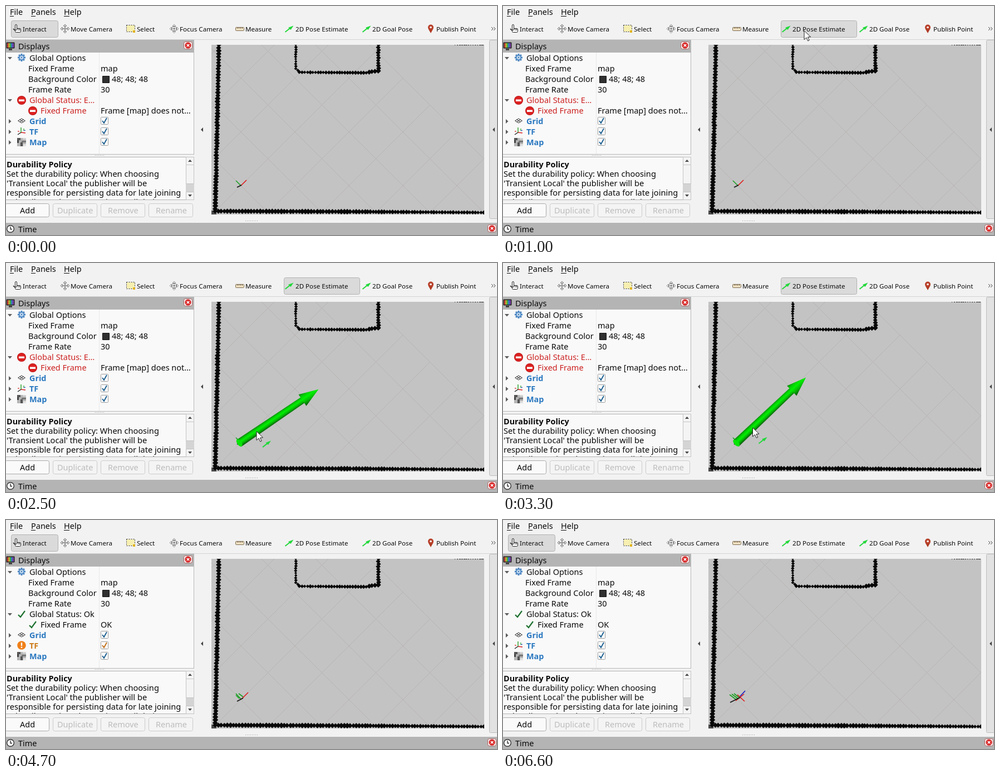
Recreate the animation shown at these times as an HTML page with a canvas. Size 882 by 413 pixels, loop 6700 ms.

```html
<!DOCTYPE html>
<html lang="en">
<head>
<meta charset="utf-8">
<title>Pose estimate</title>
<style>
html, body { margin: 0; width: 100%; height: 100%; overflow: hidden; background: #f2f2f2; }
canvas { display: block; }
</style>
</head>
<body>
<canvas id="stage" width="882" height="413"></canvas>
<script>
const ctx = document.getElementById('stage').getContext('2d');
const LOOP = 6700, STEP = 100;
const FONT = '"Noto Sans", "Open Sans", sans-serif';
const INK = '#0a0a0a', BLUE = '#2a78c0', RED = '#cc2020';
const ORIGIN = { x: 420, y: 324 };

function rect(x, y, w, h, fill) {
  ctx.fillStyle = fill;
  ctx.fillRect(x, y, w, h);
}

function box(x, y, w, h, r, fill, stroke) {
  ctx.beginPath();
  ctx.roundRect(x + 0.5, y + 0.5, w - 1, h - 1, r);
  ctx.fillStyle = fill;
  ctx.fill();
  if (stroke) {
    ctx.lineWidth = 1;
    ctx.strokeStyle = stroke;
    ctx.stroke();
  }
}

function path(pts, close) {
  ctx.beginPath();
  pts.forEach(([x, y], i) => i ? ctx.lineTo(x, y) : ctx.moveTo(x, y));
  if (close) ctx.closePath();
}

function poly(pts, fill) {
  path(pts, true);
  ctx.fillStyle = fill;
  ctx.fill();
}

function line(pts, color, width = 1) {
  path(pts);
  ctx.strokeStyle = color;
  ctx.lineWidth = width;
  ctx.stroke();
}

function disc(x, y, r, fill) {
  ctx.beginPath();
  ctx.arc(x, y, r, 0, 7);
  ctx.fillStyle = fill;
  ctx.fill();
}

function text(s, x, y, color = INK, size = 14.5, weight = 400) {
  ctx.font = `${weight} ${size}px ${FONT}`;
  ctx.fillStyle = color;
  ctx.fillText(s, x, y);
}

function at(x, y, draw) {
  ctx.save();
  ctx.translate(x, y);
  draw();
  ctx.restore();
}

function random(seed) {
  return () => (seed = (seed * 16807) % 2147483647) / 2147483647;
}

// Small icons, drawn around the origin
const poseIcon = () => {
  line([[-7.5, 6], [2, -1.5]], '#22d83a', 2);
  poly([[7.5, -5.5], [2.5, 2], [-2, -2]], '#22d83a');
};

const handIcon = () => {
  box(-4, -1, 11, 8, 2, '#fff', '#222');
  box(-4, -8, 4, 11, 2, '#fff', '#222');
  line([[-4, 3], [-7, 0]], '#222', 1.5);
  line([[2, 0], [2, 3]], '#222');
  line([[4.5, 0], [4.5, 3]], '#222');
};

function crossArrows(color) {
  for (let i = 0; i < 4; i++) {
    ctx.rotate(Math.PI / 2);
    line([[0, 2], [0, 5]], color, 1.5);
    path([[-3, 5], [0, 8], [3, 5]], true);
    ctx.fillStyle = '#fff';
    ctx.fill();
    ctx.strokeStyle = color;
    ctx.lineWidth = 1;
    ctx.stroke();
  }
}

const moveIcon = () => {
  crossArrows('#777');
  disc(0, 0, 2, '#999');
};

const focusIcon = () => {
  crossArrows('#999');
  ctx.beginPath();
  ctx.arc(0, 0, 4.5, 0, 7);
  ctx.strokeStyle = '#666';
  ctx.stroke();
  disc(0, 0, 1.2, '#444');
};

const selectIcon = () => {
  rect(-7, -6, 14, 11, '#f7efb0');
  ctx.setLineDash([2, 2]);
  ctx.strokeStyle = '#333';
  ctx.lineWidth = 1;
  ctx.strokeRect(-7.5, -6.5, 15, 12);
  ctx.setLineDash([]);
  rect(4, 3, 4, 4, '#e0b010');
};

const rulerIcon = () => {
  box(-8, -3, 16, 7, 1, '#f0e2c4', '#7a6850');
  for (let x = -5; x < 7; x += 3) line([[x + 0.5, -3], [x + 0.5, 0]], '#6a5840');
};

const pinIcon = () => {
  poly([[-4.5, 0], [4.5, 0], [0, 8]], '#b03a20');
  disc(0, -2.5, 5, '#b8402a');
  disc(0, -2.5, 1.8, '#fff');
};

const gearIcon = () => {
  for (let i = 0; i < 8; i++) {
    ctx.rotate(Math.PI / 4);
    rect(-1.5, -7, 3, 3, '#4a82bd');
  }
  disc(0, 0, 5.2, '#5b93cc');
  disc(0, 0, 3, '#dce9f6');
  disc(0, 0, 1.4, '#4a82bd');
};

const gridIcon = () => {
  for (const k of [-1, 0, 1]) {
    const dx = k * 3.2, dy = k * 2;
    line([[dx - 3.2, dy + 2], [dx + 3.2, dy - 2]], '#333');
    line([[dx - 3.2, -dy - 2], [dx + 3.2, -dy + 2]], '#333');
  }
};

const tfIcon = () => {
  line([[-1, 2], [-1, -7]], '#28a028', 1.4);
  line([[-1, 2], [7, 3]], '#d82020', 1.4);
  line([[-1, 2], [-7, 6]], '#222', 1.4);
  line([[4, -1], [4, -5]], '#28a028', 1.2);
  line([[4, -1], [7, -2]], '#2040c0', 1.2);
  line([[-7, 0], [-4, 0]], '#d82020', 1.2);
};

const mapIcon = () => {
  rect(-8, -7, 16, 15, '#b4b4b4');
  rect(-8, -7, 6, 4, '#555');
  rect(-8, -3, 3, 5, '#444');
  rect(0, -2, 8, 3, '#777');
  rect(-2, 1, 4, 7, '#555');
  rect(3, 4, 5, 4, '#e2e2e2');
  rect(2, -7, 6, 3, '#d4d4d4');
};

const errorIcon = () => {
  disc(0, 0, 8, '#c41818');
  disc(0, 0, 6.8, '#dd2222');
  rect(-5, -1.5, 10, 3.5, '#fff');
};

const okIcon = () => line([[-6, 1], [-2, 5], [6, -6]], '#1d7030', 2.2);

const warnIcon = () => {
  disc(0, 0, 7.8, '#f08018');
  rect(-1.2, -5, 2.4, 6, '#fff');
  rect(-1.2, 2.5, 2.4, 2.4, '#fff');
};

const closeIcon = () => {
  box(-8, -7, 16, 14, 3, '#f2eeee', '#b06060');
  disc(0, 0, 5.5, '#d82424');
  line([[-2.3, -2.3], [2.3, 2.3]], '#fff', 1.6);
  line([[2.3, -2.3], [-2.3, 2.3]], '#fff', 1.6);
};

function expander(y, open) {
  poly(open ? [[3, y - 2], [11, y - 2], [7, y + 2.5]] : [[5, y - 4], [9.5, y], [5, y + 4]], '#5c5c5c');
}

function tool(x, label, iconX, icon, span, checked) {
  if (checked) box(span[0], 26, span[1], 31, 3, '#dadada', '#b2b2b2');
  at(iconX, 41, icon);
  text(label, x, 46, INK, 11.6);
}

function toolbar(posing) {
  text('File', 7, 16);
  text('Panels', 45, 16);
  text('Help', 104, 16);
  for (const [x, w] of [[7, 7], [45, 8], [104, 10]]) rect(x, 18, w, 1, INK);
  tool(30, 'Interact', 20, handIcon, [9, 85], !posing);
  tool(116, 'Move Camera', 106, moveIcon);
  tool(235, 'Select', 224, selectIcon);
  tool(312, 'Focus Camera', 302, focusIcon);
  tool(430, 'Measure', 420, rulerIcon);
  tool(520, '2D Pose Estimate', 509, poseIcon, [499, 137], posing);
  tool(658, '2D Goal Pose', 648, poseIcon);
  tool(773, 'Publish Point', 763, pinIcon);
  for (const x of [872, 876]) line([[x, 38], [x + 3, 41], [x, 44]], '#444');
}

function checkbox(y, color) {
  box(170, y - 7, 14, 14, 1, '#fff', '#9a9a9a');
  line([[173, y], [176, y + 4], [181, y - 5]], color, 2);
}

function displays(ok, warn) {
  rect(0, 61, 338, 23, '#b4b4b4');
  box(0, 65, 16, 12, 1, '#222');
  ['#c83a3a', '#d0c030', '#38b048', '#3880d0', '#8040b0'].forEach((c, i) => rect(2 + i * 2.4, 67, 2.4, 8, c));
  rect(5, 77, 6, 3, '#444');
  text('Displays', 22, 78);
  at(327, 71, closeIcon);

  rect(0, 84, 338, 184, '#f9f9f9');
  rect(0, 267, 338, 1, '#b8b8b8');
  rect(337, 84, 1, 184, '#b8b8b8');
  rect(167, 84, 1, 183, '#e8e8e8');

  expander(94, true);
  at(28, 93, gearIcon);
  text('Global Options', 42, 99);
  text('Fixed Frame', 40, 118);
  text('map', 170, 118);
  text('Background Color', 40, 137);
  box(173, 126, 13, 13, 0, '#303030', '#111');
  text('48; 48; 48', 190, 137);
  text('Frame Rate', 40, 156);
  text('30', 170, 156);

  const tone = ok ? INK : RED, mark = ok ? okIcon : errorIcon;
  expander(170, true);
  at(28, 170, mark);
  text(ok ? 'Global Status: Ok' : 'Global Status: E…', 42, 175, tone);
  at(48, 189, mark);
  text('Fixed Frame', 62, 194, tone);
  text(ok ? 'OK' : 'Frame [map] does not…', 170, 194);

  [['Grid', gridIcon], ['TF', warn ? warnIcon : tfIcon], ['Map', mapIcon]].forEach(([name, icon], i) => {
    const y = 208 + i * 19, alert = warn && i === 1;
    expander(y, false);
    at(28, y - 1, icon);
    text(name, 42, y + 5, alert ? '#cc7a18' : BLUE, 14.4, 700);
    checkbox(y - 1, alert ? '#c0701c' : '#1e6090');
  });
}

function dots(x0, x1, y) {
  for (let x = x0; x < x1; x += 3) rect(x, y, 1, 1, '#999');
}

function help() {
  dots(160, 178, 269);
  rect(0, 272, 338, 78, '#f9f9f9');
  ctx.save();
  ctx.beginPath();
  ctx.rect(0, 272, 323, 77);
  ctx.clip();
  text('Durability Policy', 1, 291, INK, 14.4, 700);
  ['Set the durability policy: When choosing', "'Transient Local' the publisher will be",
    'responsible for persisting data for late joining', 'subscribers when they arrive, until their'
  ].forEach((s, i) => text(s, 1, 308 + i * 17, INK, 14.6));
  ctx.restore();
  rect(0, 272, 338, 1, '#b4b4b4');
  rect(0, 349, 338, 1, '#b4b4b4');
  rect(323, 273, 15, 76, '#d4d4d4');
  box(323, 272, 15, 15, 0, '#f4f4f4', '#c4c4c4');
  box(323, 286, 15, 35, 0, '#f4f4f4', '#c4c4c4');
  box(323, 335, 15, 15, 0, '#f4f4f4', '#c4c4c4');
  poly([[327, 281], [334, 281], [330.5, 277]], '#444');
  poly([[327, 340], [334, 340], [330.5, 344]], '#444');

  ['Add', 'Duplicate', 'Remove', 'Rename'].forEach((s, i) => {
    box(i ? i * 86 - 2 : -2, 356, 80, 25, 3, i ? '#f4f4f4' : '#fafafa', i ? '#cbcbcb' : '#aaa');
    text(s, [25, 92, 183, 269][i], 374, i ? '#bcbcbc' : INK);
  });
}

function diamonds(x0, y0, x1, y1, gap, r0, r1, seed) {
  const rnd = random(seed), n = Math.round(Math.hypot(x1 - x0, y1 - y0) / gap);
  for (let i = 0; i <= n; i++) {
    const k = i / n, r = r0 + (r1 - r0) * k + rnd() * 0.9 - 0.3;
    const x = x0 + (x1 - x0) * k + rnd() - 0.5, y = y0 + (y1 - y0) * k;
    poly([[x - r, y], [x, y - r], [x + r, y], [x, y + r]], '#080808');
  }
}

// Ten-cell grid seen at 45 degrees, centred on the frame origin
function floorGrid() {
  const cx = 422, cy = 324, half = 48.5, reach = 5 * half;
  for (let i = -5; i <= 5; i++) {
    const d = i * half;
    line([[cx + d - reach, cy - d - reach], [cx + d + reach, cy - d + reach]], '#b9b3b3');
    line([[cx + d - reach, cy + d + reach], [cx + d + reach, cy + d - reach]], '#b9b3b3');
  }
}

function axis(dx, dy, x, y, color) {
  line([[ORIGIN.x + dx, ORIGIN.y + dy], [x, y]], color, 1.6);
}

function axes(state) {
  const G = '#18a020', R = '#e01818', K = '#141414', B = '#1818c0';
  if (state === 0) {
    axis(2, 0, 413, 315, G);
    axis(2, 0, 432, 314, R);
    axis(3, -1, 415, 327, K);
  } else if (state === 1) {
    axis(2, -1, 413, 313, G);
    axis(-1, -2, 413, 316, G);
    axis(6, -5, 418, 313, G);
    axis(3, -1, 435, 311, R);
    axis(6, -3, 415, 327, K);
  } else {
    axis(-1, 0, 407, 315, G);
    axis(2, -2, 411, 314, G);
    axis(4, -4, 415, 313, G);
    axis(5, -5, 435, 308, B);
    axis(-2, 2, 433, 314, R);
    axis(1, -9, 434, 327, R);
    axis(6, -4, 408, 329, K);
  }
}

// Shaded pose arrow, fixed length, turned towards the pointer
function poseArrow(angle) {
  const shade = (h) => {
    const g = ctx.createLinearGradient(0, -h, 0, h);
    g.addColorStop(0, '#0a800a');
    g.addColorStop(0.25, '#04d004');
    g.addColorStop(0.45, '#00f000');
    g.addColorStop(0.7, '#06b806');
    g.addColorStop(1, '#085008');
    return g;
  };
  at(ORIGIN.x, ORIGIN.y, () => {
    ctx.rotate(angle);
    poly([[-2, -7.5], [140, -6], [140, 6], [-2, 7.5]], shade(7.5));
    ctx.beginPath();
    ctx.ellipse(-1, 0, 4, 7.5, 0, 0, 7);
    ctx.fillStyle = '#08e408';
    ctx.fill();
    poly([[136, -12.5], [171, 0], [136, 12.5]], shade(12.5));
  });
}

function scene(state, angle) {
  ctx.save();
  ctx.beginPath();
  ctx.rect(369, 70, 490, 306);
  ctx.clip();
  rect(369, 70, 490, 306, '#c3c3c3');
  floorGrid();
  diamonds(382.5, 70, 376, 366, 5.4, 4.6, 4.7, 11);
  rect(369, 369, 9, 7, '#4c4c4c');
  diamonds(376, 370, 640, 371, 5.4, 4.6, 4.6, 23);
  diamonds(640, 371, 858, 372.5, 5, 4.2, 3.4, 37);
  diamonds(520.5, 70, 520.5, 113, 4.4, 2.6, 2.8, 41);
  diamonds(521, 113, 527, 119, 4, 2.6, 3, 43);
  diamonds(527, 119.5, 652, 120.5, 4.8, 3.2, 3.5, 47);
  diamonds(652, 119, 668, 117, 5, 4.6, 4.6, 53);
  diamonds(669, 70, 669, 117, 4.8, 3.9, 4.2, 59);
  const rnd = random(71);
  for (let x = 806; x < 857; x += 4) rect(x, 70, 1 + rnd() * 3, 1, '#222');
  axes(state);
  if (angle !== null) poseArrow(angle);
  ctx.restore();
}

function pointer(x, y, dark) {
  at(x, y, () => {
    path([[0, 0], [0, 16], [4, 12.5], [6.8, 18.5], [9.2, 17.3], [6.5, 11.6], [11.5, 11.2]], true);
    ctx.fillStyle = dark ? '#333' : '#fff';
    ctx.fill();
    ctx.strokeStyle = dark ? '#ddd' : '#222';
    ctx.lineWidth = 1;
    ctx.stroke();
  });
}

// Pointer route: time, x, y
const ROUTE = [
  [200, 556, -20], [500, 537, 53], [900, 541, 43], [1100, 541, 46], [1600, 420, 324], [1900, 420, 324],
  [2200, 444, 308], [2500, 450, 303.6], [3300, 448.5, 297], [3700, 448.5, 297], [4200, 890, 335]
];

function pointerAt(t) {
  const i = ROUTE.findIndex((p) => p[0] > t);
  if (i < 1) return null;
  const [t0, x0, y0] = ROUTE[i - 1], [t1, x1, y1] = ROUTE[i];
  const k = (t - t0) / (t1 - t0), e = k * k * (3 - 2 * k);
  return { x: x0 + (x1 - x0) * e, y: y0 + (y1 - y0) * e };
}

function draw(t) {
  const posing = t >= 900 && t < 3700;
  const ok = t >= 3900, warn = ok && t < 6400;
  const p = pointerAt(t);
  const dragging = t >= 2000 && t < 3700;
  const angle = dragging ? Math.atan2(p.y - ORIGIN.y, p.x - ORIGIN.x) : null;

  rect(0, 0, 882, 413, '#f2f2f2');
  toolbar(posing);
  rect(0, 60, 882, 1, '#d4d4d4');
  displays(ok, warn);
  help();
  box(868, 61, 16, 323, 2, '#e2e2e2', '#bcbcbc');
  for (const x of [350, 874]) poly([[x + 4, 219], [x + 4, 227], [x, 223]], '#444');
  scene(ok ? (warn ? 1 : 2) : 0, angle);

  dots(430, 453, 387);
  rect(0, 391, 882, 22, '#b4b4b4');
  disc(8, 402, 7, '#333');
  disc(8, 402, 5.6, '#fff');
  line([[8, 398], [8, 402.5], [11, 402.5]], '#222', 1.3);
  text('Time', 22, 408);
  at(873, 401, closeIcon);

  if (p) {
    if (posing && p.y > 70) at(p.x + 18.5, p.y + 22.5, poseIcon);
    pointer(p.x, p.y, t < 900);
  }
}

let start = null, shown = -1;
function tick(now) {
  if (start === null) start = now;
  const t = Math.floor(((now - start) % LOOP) / STEP) * STEP;
  if (t !== shown) draw(shown = t);
  requestAnimationFrame(tick);
}
requestAnimationFrame(tick);
</script>
</body>
</html>
```
